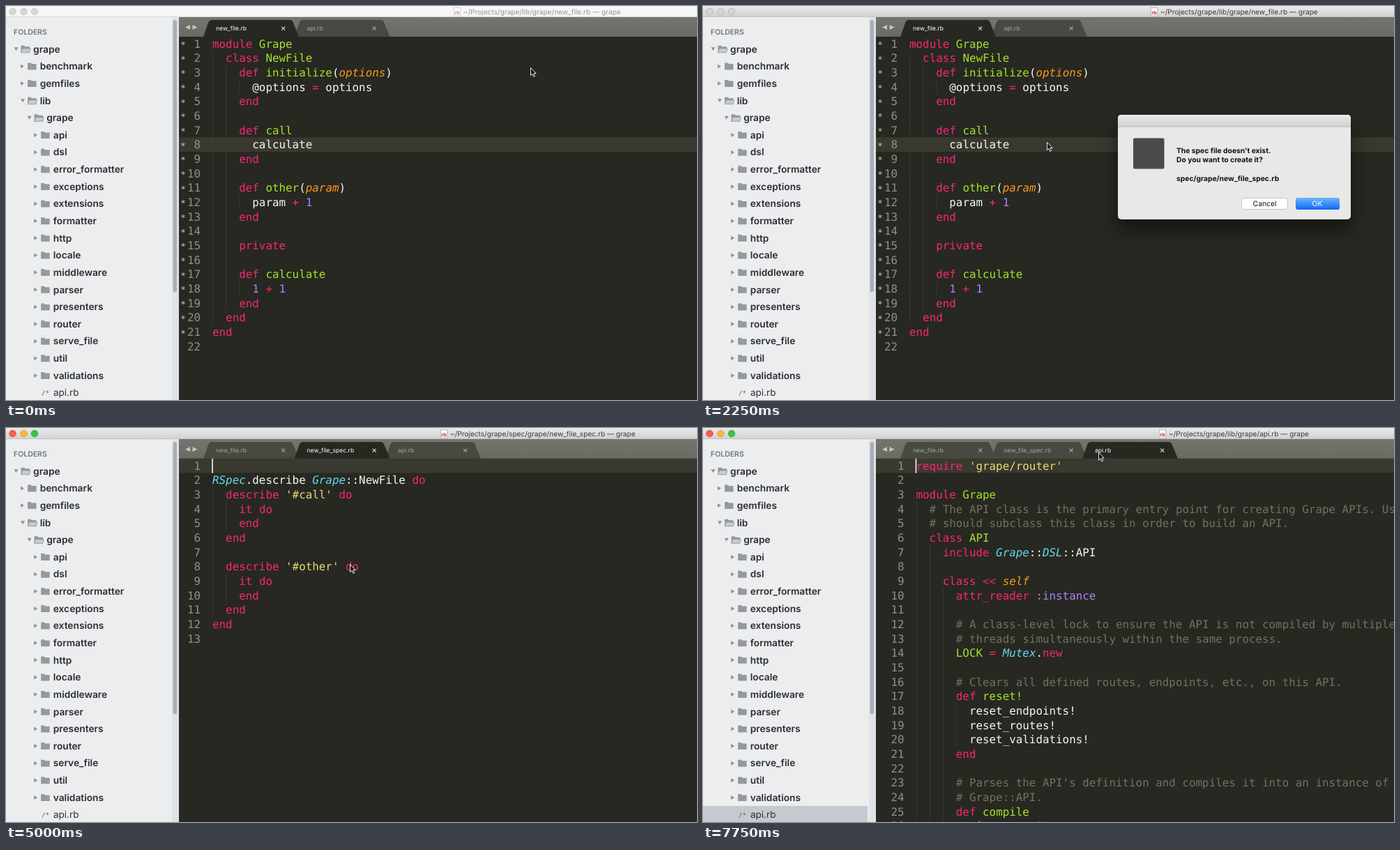
Write an HTML page that moves like this. It is 991 by 565 pixels and loops after 8 s.

```html
<!DOCTYPE html>
<html lang="en">
<head>
<meta charset="utf-8">
<title>Editor session</title>
<style>
  html, body { margin: 0; width: 100%; height: 100%; overflow: hidden; background: #272822; }
  svg { display: block; width: 991px; height: 565px; }
  text { white-space: pre; text-rendering: geometricPrecision; font-family: Inter, Roboto, sans-serif; }
  .code text { font: 15.87px "DejaVu Sans Mono", "Liberation Mono", monospace; fill: #f8f8f2; }
  .code .num { fill: #8f908a; text-anchor: end; }
  .code .mark { font-size: 12.5px; fill: #d0d0ca; }
  .p { fill: #f92672; } .g { fill: #a6e22e; } .v { fill: #ae81ff; }
  .y { fill: #e6db74; } .c { fill: #75715e; }
  .b { fill: #66d9ef; font-style: italic; }
  .o { fill: #fd971f; font-style: italic; }
  .guide { stroke: #45463d; stroke-width: 1; stroke-dasharray: 1 1; }
  .title text { font-size: 10.1px; fill: #3a3a3a; }
  .idle .title { opacity: .5; }
  .dir { font-size: 13.75px; font-weight: 600; fill: #2b2e31; }
  .file { font-size: 13.5px; fill: #2b2e31; }
  .tab text { font-size: 8.55px; fill: #a5a69f; }
  .tab path { fill: #484943; }
  .tab .x { fill: none; stroke: #a5a69f; stroke-width: 1.2; }
  .tab.on path { fill: #272822; }
  .tab.on text { fill: #fff; }
  .tab.on .x { fill: none; stroke: #d8d8d4; }
  .dialog text { font-size: 10.3px; font-weight: 700; fill: #111; }
  .dialog .btn { font-size: 10.3px; font-weight: 400; text-anchor: middle; }
</style>
</head>
<body>
<script>
const ROW = 20.67, TOP = 43.7, CH = 9.554;

// x[...] colours a token with class x
const newFile = `p[module] g[Grape]
  p[class] g[NewFile]
    p[def] g[initialize](o[options])
      @options p[=] options
    p[end]

    p[def] g[call]
      calculate
    p[end]

    p[def] g[other](o[param])
      param p[+] v[1]
    p[end]

    p[private]

    p[def] g[calculate]
      v[1] p[+] v[1]
    p[end]
  p[end]
p[end]
`;
const spec = `
b[RSpec].describe b[Grape]::NewFile p[do]
  p[describe] y['#call'] p[do]
    p[it] p[do]
    p[end]
  p[end]

  p[describe] y['#other'] p[do]
    p[it] p[do]
    p[end]
  p[end]
p[end]
`;
const api = `p[require] y['grape/router']

p[module] g[Grape]
  c[# The API class is the primary entry point for creating Grape APIs. Users]
  c[# should subclass this class in order to build an API.]
  p[class] g[API]
    p[include] b[Grape]::b[DSL]::API

    p[class] p[&lt;&lt;] o[self]
      p[attr_reader] v[:instance]

      c[# A class-level lock to ensure the API is not compiled by multiple]
      c[# threads simultaneously within the same process.]
      g[LOCK] p[=] b[Mutex].p[new]

      c[# Clears all defined routes, endpoints, etc., on this API.]
      p[def] g[reset!]
        reset_endpoints!
        reset_routes!
        reset_validations!
      p[end]

      c[# Parses the API's definition and compiles it into an instance of]
      c[# Grape::API.]
      p[def] g[compile]
        @instance p[||=] p[new]`;

const docs = [
  { title: '~/Projects/grape/lib/grape/new_file.rb — grape', tx: 656, src: newFile, x: 296, line: 8, col: 15, marks: 21 },
  { title: '~/Projects/grape/spec/grape/new_file_spec.rb — grape', tx: 637, src: spec, x: 296, line: 1, col: 0, marks: 0 },
  { title: '~/Projects/grape/lib/grape/api.rb — grape', tx: 668, src: api, x: 305.5, line: 1, col: 0, marks: 0 }
];

const text = (x, y, s, cls = '') => `<text x="${x}" y="${y}" class="${cls}">${s}</text>`;
const rect = (x, y, w, h, fill, more = '') =>
  `<rect x="${x}" y="${y}" width="${w}" height="${h}" fill="${fill}" ${more}/>`;
const grad = (id, a, b) =>
  `<linearGradient id="${id}" x2="0" y2="1"><stop stop-color="${a}"/><stop offset="1" stop-color="${b}"/></linearGradient>`;
const indent = s => s.search(/\S/);
const paint = s => s.trim().replace(/([pgvycbo])\[(.*?)\]/g, '<tspan class="$1">$2</tspan>');

function docView(d) {
  const lines = d.src.split('\n');
  let out = rect(248, TOP + (d.line - 1) * ROW, 743, ROW, '#3a392f');
  lines.forEach((s, i) => {
    const top = TOP + i * ROW, base = top + 15.8;
    const depth = indent(s) < 0 ? indent(lines.slice(i).find(l => l) || 'x') : indent(s);
    for (let c = 0; c < depth; c += 2) {
      const gx = Math.round(d.x + c * CH) + .5;
      out += `<path class="guide" d="M${gx} ${top}v${ROW}"/>`;
    }
    out += text(d.x - 17, base, i + 1, 'num');
    if (i < d.marks) out += text(250.2, base + .6, '*', 'mark');
    if (s) out += text(d.x + depth * CH, base, paint(s));
  });
  const page = rect(d.tx - 13.5, 2.5, 9, 11.5, '#fff', 'stroke="#a8a8a8" stroke-width=".8"') +
    `<text x="${d.tx - 12.6}" y="12" style="font-size:7px;font-weight:700;fill:#c8232c">rb</text>`;
  return `<g class="doc"><g class="code">${out}</g><g class="title">${page}${text(d.tx, 12.1, d.title)}</g></g>`;
}

function sidebar() {
  const rows = [[0, 'grape', 1], [1, 'benchmark'], [1, 'gemfiles'], [1, 'lib', 1], [2, 'grape', 1]];
  'api dsl error_formatter exceptions extensions formatter http locale middleware parser presenters router serve_file util validations'
    .split(' ').forEach(n => rows.push([3, n]));
  let out = rect(0, 16, 248, 549, '#ebedef') + rect(238, 17, 10, 548, '#dfe2e6') +
    rect(239.5, 20, 5.5, 390, '#a9aeb7', 'rx="2.5"') + rect(0, 542, 236, 23, '#c6c9d0', 'id="pick"') +
    `<text x="11" y="40.7" style="font-size:10.5px;font-weight:600;fill:#70767b">FOLDERS</text>`;
  rows.forEach(([level, name, open], i) => {
    const x = 11.5 + level * 9.55, y = 61.8 + i * 24.64;
    out += `<path fill="#8f9296" d="M${x} ${open ? y - 2.5 + 'h6l-3 5z' : y - 3 + 'v6l5 -3z'}"/>`;
    out += `<path fill="#96999b" d="M${x + 10} ${y - 5}h4.5l1.5 1.5h6.5v8.5h-12.5z"/>`;
    if (open) out += `<path fill="#c9cccf" stroke="#8f9296" stroke-width=".8" d="M${x + 10} ${y + 5}l2 -5.8h11.5l-1.5 5.8z"/>`;
    out += text(x + 27.6, y + 4.8, name, 'dir');
  });
  return out + `<text x="51" y="557.5" style="font:9px 'DejaVu Sans Mono',monospace;fill:#55595d">/*</text>` +
    text(68, 559.4, 'api.rb', 'file');
}

const tab = name => `<g class="tab">
  <path d="M283 44L290.5 23Q292 20 295 20H407Q410 20 411.5 23L420 44Z"/>
  ${text(301, 35, name)}<path class="x" d="M395.2 29.7l5 5m0-5l-5 5"/></g>`;

const dialog = `<g id="dialog" class="dialog">
  <g id="shade">${rect(595, 156, 334, 150, '#e8e8e8', 'rx="5"')}</g>
  <path fill="url(#bar)" d="M595 173V161q0-5 5-5H924q5 0 5 5V173z"/>
  ${rect(595, 172.5, 334, 1, '#b9b9b9')}
  ${rect(617, 189.5, 44.5, 44, '#4a4a4a', 'rx="2"')}
  ${text(679, 210.7, "The spec file doesn't exist.")}
  ${text(679, 224.2, 'Do you want to create it?')}
  ${text(679, 251.4, 'spec/grape/new_file_spec.rb')}
  ${rect(772.5, 275.5, 66, 16, '#fff', 'rx="3" stroke="#c4c4c4"')}
  ${text(805.5, 287.2, 'Cancel', 'btn')}
  ${rect(850, 275, 63, 17, 'url(#ok)', 'rx="3"')}
  <text x="881" y="287.2" class="btn" style="fill:#fff">OK</text></g>`;

document.body.innerHTML = `<svg viewBox="0 0 991 565">
  <defs>${grad('bar', '#eaeaea', '#d1d1d1')}${grad('tabs', '#74756f', '#696a64')}${grad('ok', '#6cb4fb', '#0d6af8')}</defs>
  ${rect(0, 0, 991, 565, '#272822')}
  ${rect(0, 0, 991, 16, 'url(#bar)', 'id="top"')}
  ${rect(0, 15.5, 991, 1, '#b4b4b4')}
  ${sidebar()}
  ${rect(248, 16.5, 743, 27.5, 'url(#tabs)')}
  <path fill="#c4c5c0" d="M264 27v7l-7-3.5zM267.5 27v7l7-3.5z"/>
  ${[9.5, 25.5, 41].map(x => `<circle class="light" cx="${x}" cy="8" r="4.8" stroke-width=".8"/>`).join('')}
  <g id="tabBar">${['new_file.rb', 'new_file_spec.rb', 'api.rb'].map(tab).join('')}</g>
  ${docs.map(docView).join('')}
  ${rect(0, 0, 1.6, 21, '#f8f8f0', 'id="caret"')}
  ${dialog}
  <path id="mouse" fill="#151515" stroke="#fff" stroke-width=".9" stroke-linejoin="round"
    d="M.5 .5V11.6L3 9.3L4.8 13.4L6.6 12.6L4.9 8.6H8.2Z"/>
</svg>`;

const $ = id => document.getElementById(id);
const all = s => [...document.querySelectorAll(s)];
const svg = document.querySelector('svg');
const tabs = all('.tab'), views = all('.doc'), lights = all('.light');
const W = 130.5, LOOP = 8000;

// each step changes part of the state from its time on
const steps = [
  [0, { doc: 0, mode: 'idle', caret: 0, mouse: [752, 88], zoom: 0, fade: 0, shade: 0, spec: 0, apiX: W }],
  [250, { mouse: [568, 132] }],
  [500, { mouse: [491, 191] }],
  [750, { mouse: [461, 200] }],
  [1000, { mode: 'live', caret: .9 }],
  [1250, { mouse: [493, 195], caret: 1 }],
  [1500, { caret: 0 }],
  [2000, { mode: 'modal', zoom: .072, fade: .25 }],
  [2250, { zoom: 1, fade: 1, shade: .5 }],
  [2500, { shade: .58 }],
  [3750, { doc: 1, mode: 'live', zoom: 0, fade: 0, caret: .9, apiX: W + 35 }],
  [4000, { caret: 1, spec: .8, apiX: 2 * W }],
  [4250, { caret: .15, spec: 1 }],
  [4500, { caret: 0 }],
  [4750, { caret: .8 }],
  [5000, { caret: 1 }],
  [5250, { doc: 0 }],
  [5750, { caret: 0 }],
  [6250, { caret: .9 }],
  [6500, { caret: 1 }],
  [6750, { caret: 0, mouse: [566, 26] }],
  [7000, { mouse: [569, 9] }],
  [7250, { caret: 1, mouse: [570, 24] }],
  [7500, { doc: 2, mouse: [567, 26] }],
  [7750, { mouse: [567, 34.5] }]
];

const move = (el, x, y) => el.setAttribute('transform', `translate(${x} ${y})`);

function show(s) {
  const d = docs[s.doc], live = s.mode === 'live';
  svg.setAttribute('class', s.mode);
  $('top').setAttribute('fill', s.mode === 'idle' ? '#f6f6f6' : 'url(#bar)');
  lights.forEach((el, i) => {
    el.setAttribute('fill', live ? ['#fb5a55', '#f5bb3d', '#34c648'][i] : '#d6d6d6');
    el.setAttribute('stroke', live ? ['#df4744', '#d9a033', '#27a835'][i] : s.mode === 'idle' ? '#c6c6c6' : '#adadad');
  });
  views.forEach((el, i) => el.style.display = i === s.doc ? '' : 'none');
  $('pick').style.display = s.doc === 2 ? '' : 'none';

  [0, W, s.apiX].forEach((x, i) => move(tabs[i], x, 0));
  tabs[1].style.opacity = s.spec;
  tabs.forEach((el, i) => el.classList.toggle('on', i === s.doc));
  $('tabBar').append(tabs[2], tabs[1], tabs[0], tabs[s.doc]);

  move($('caret'), d.x + d.col * CH - .8, TOP + (d.line - 1) * ROW);
  $('caret').style.opacity = s.caret;
  move($('mouse'), ...s.mouse);

  $('dialog').style.opacity = s.fade;
  $('dialog').setAttribute('transform', `translate(762 231) scale(${s.zoom}) translate(-762 -231)`);
  $('shade').style.filter = `drop-shadow(0 15px 14px rgba(0,0,0,${s.shade}))`;
}

const start = performance.now();
let last = -1;
function tick() {
  const t = (performance.now() - start) % LOOP;
  const past = steps.filter(([at]) => at <= t);
  if (past.length !== last) {
    last = past.length;
    show(Object.assign({}, ...past.map(step => step[1])));
  }
  requestAnimationFrame(tick);
}
tick();
</script>
</body>
</html>
```
